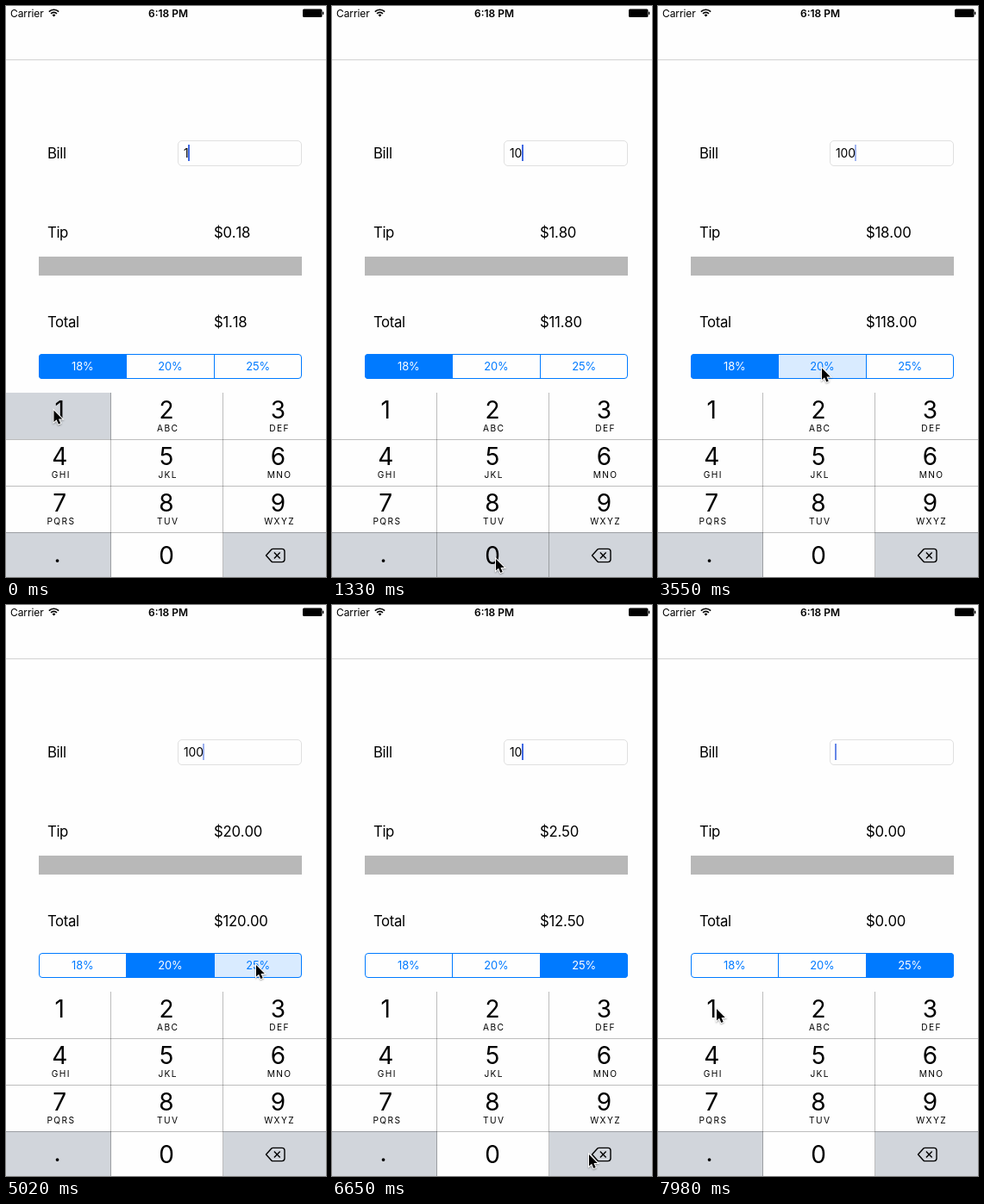
Write an HTML page with a canvas that moves like this. It is 371 px wide and 663 px high and loops after 8000 ms.

```html
<!DOCTYPE html>
<html lang="en">
<head>
<meta charset="utf-8">
<title>Tip calculator</title>
<style>
html, body { margin: 0; width: 100%; height: 100%; overflow: hidden; background: #fefefe; }
canvas { display: block; }
</style>
</head>
<body>
<canvas id="stage" width="371" height="663"></canvas>
<script>
const ctx = document.getElementById('stage').getContext('2d');
const LOOP = 8000, STEP = 147.8;
const BLUE = '#007aff', GRAY = '#d1d5db', WHITE = '#fefefe', BLACK = '#000';

// Pointer stops: arrival time, place, travel time, and the taps made there.
const stops = [
  { at: 0, x: 55.5, y: 469.5, travel: 0, taps: [0], hold: 140, key: '1' },
  { at: 1030, x: 190, y: 642, travel: 850, taps: [1180, 1625], hold: 250, key: '0' },
  { at: 2660, x: 190, y: 420.5, travel: 780, taps: [3540], hold: 290, segment: 1 },
  { at: 4730, x: 290, y: 418, travel: 700, taps: [5020], hold: 290, segment: 2 },
  { at: 5900, x: 317, y: 573.5, travel: 560, taps: [] },
  { at: 6500, x: 298, y: 638, travel: 560, taps: [6500, 6945, 7240, 7535], hold: 140, key: 'del' },
  { at: 7980, x: 68, y: 469, travel: 440, taps: [] },
];
const percents = [18, 20, 25];
const letters = ['', 'ABC', 'DEF', 'GHI', 'JKL', 'MNO', 'PQRS', 'TUV', 'WXYZ'];
const clamp = v => Math.min(1, Math.max(0, v));

// Replays all taps up to time t.
function stateAt(t) {
  const s = { bill: '', rate: 0, key: '', segment: -1, typed: 0 };
  for (const { taps, hold, key, segment } of stops) {
    for (const tap of taps) {
      if (tap > t) continue;
      const held = t < tap + hold;
      if (key) {
        s.bill = key === 'del' ? s.bill.slice(0, -1) : s.bill + key;
        s.typed = tap;
        if (held) s.key = key;
      } else if (held) s.segment = segment;
      else s.rate = segment;
    }
  }
  return s;
}

// Solid after typing, then blinking with short fades.
function caretAlpha(since) {
  const period = 970, dark = 724;
  const cycle = Math.max(0, Math.round((since - dark) / period));
  return clamp((Math.abs(since - dark - cycle * period) - 230) / 160 + 0.5);
}

function pointerAt(t) {
  let [x, y] = [stops[0].x, stops[0].y];
  for (const s of stops.slice(1)) {
    const u = clamp((t - s.at + s.travel) / s.travel), e = u * u * (3 - 2 * u);
    x += (s.x - x) * e;
    y += (s.y - y) * e;
  }
  return [x, y];
}

function text(str, x, y, size, { color = BLACK, align = 'left', weight = 400, spacing = 0, kern = 'auto' } = {}) {
  ctx.font = `${weight} ${size}px Inter, "Open Sans", sans-serif`;
  ctx.letterSpacing = spacing + 'px';
  ctx.fontKerning = kern;
  ctx.textAlign = align;
  ctx.fillStyle = color;
  ctx.fillText(str, x, y);
  return ctx.measureText(str).width;
}

function rect(x, y, w, h, color) {
  ctx.fillStyle = color;
  ctx.fillRect(x, y, w, h);
}

function roundPath(x, y, w, h, r) {
  ctx.beginPath();
  ctx.roundRect(x, y, w, h, r);
}

function fill(color) {
  ctx.fillStyle = color;
  ctx.fill();
}

function stroke(color, width) {
  ctx.strokeStyle = color;
  ctx.lineWidth = width;
  ctx.stroke();
}

function drawStatus() {
  text('Carrier', 5, 12.5, 12, { spacing: -0.1 });
  text('6:18 PM', 188, 12.5, 12, { align: 'center', weight: 600 });
  const from = -Math.PI * 3 / 4, to = -Math.PI / 4;
  for (const r of [4.9, 8]) {
    ctx.beginPath();
    ctx.arc(55.5, 12.3, r, from, to);
    stroke(BLACK, 1.6);
  }
  ctx.beginPath();
  ctx.moveTo(55.5, 12.6);
  ctx.arc(55.5, 12.3, 2.7, from, to);
  fill(BLACK);
  roundPath(344, 3.5, 22.5, 9.5, 1.5);
  fill(BLACK);
  rect(367, 6.7, 1.3, 3.2, BLACK);
  rect(0, 62, 371, 1, '#d2d2d2');
}

function drawForm(state, t) {
  const bill = Number(state.bill), tip = bill * percents[state.rate] / 100;
  const label = (str, y) => text(str, 48, y, 16.8, { spacing: -0.4 });
  const amount = (v, y) => text('$' + v.toFixed(2), 241, y, 16.8, { spacing: -0.25, kern: 'none' });
  label('Bill', 177);
  label('Tip', 269);
  label('Total', 373);
  amount(tip, 269);
  amount(bill + tip, 373);
  rect(38, 291, 305, 22, '#b8b8b8');

  roundPath(199.5, 156.5, 143, 29, 4.5);
  stroke('#e0e0e0', 1);
  const width = text(state.bill, 206, 176, 13.9, { spacing: -0.1, kern: 'none' });
  ctx.globalAlpha = caretAlpha(t - state.typed);
  rect(206 + Math.round(width - 0.6), 161, 2, 19, '#4169e1');
  ctx.globalAlpha = 1;
}

function drawSegments({ rate, segment }) {
  const w = 305 / 3;
  ctx.save();
  roundPath(38, 404, 305, 29, 4);
  ctx.clip();
  percents.forEach((p, i) => {
    const x = 38 + i * w, on = i === rate;
    if (on || i === segment) rect(x, 404, w, 29, on ? BLUE : '#d9ebff');
    if (i) rect(Math.floor(x), 404, 1, 29, BLUE);
    text(p + '%', x + w / 2, 423, 12.9, { color: on ? WHITE : BLUE, align: 'center', spacing: -0.1 });
  });
  ctx.restore();
  roundPath(38.5, 404.5, 304, 28, 3.5);
  stroke(BLUE, 1);
}

function drawDelete(pressed) {
  ctx.lineJoin = 'round';
  ctx.beginPath();
  ctx.moveTo(301.5, 638);
  ctx.arcTo(308.4, 630.4, 323, 630.4, 2);
  ctx.arcTo(323, 630.4, 323, 645.6, 3);
  ctx.arcTo(323, 645.6, 308.4, 645.6, 3);
  ctx.arcTo(308.4, 645.6, 301.5, 638, 2);
  ctx.closePath();
  if (pressed) fill(BLACK);
  stroke(BLACK, 1.4);
  ctx.beginPath();
  for (const s of [-3.4, 3.4]) {
    ctx.moveTo(310.9, 638 - s);
    ctx.lineTo(317.7, 638 + s);
  }
  stroke(pressed ? WHITE : BLACK, 1.4);
}

function drawKeypad(pressed) {
  const keys = [...'123456789.0', 'del'];
  keys.forEach((key, i) => {
    const col = i % 3, row = Math.floor(i / 3);
    const x = Math.max(0, col * 130 - 8), y = 449 + row * 54;
    const mid = [62.2, 186, 315.4][col];
    const dark = (key === '.' || key === 'del') !== (key === pressed);
    rect(x, y, 130, 54, dark ? GRAY : WHITE);
    if (key === 'del') drawDelete(dark === false);
    else if (key === '.') text(key, 59.5, 645.5, 28, { align: 'center' });
    else text(key, mid, row < 3 ? y + 30 : 648, 28, { align: 'center' });
    if (letters[i]) text(letters[i], mid + 1.7, y + 45, 10.2, { align: 'center', spacing: 1.4 });
  });
  const line = 'rgba(0, 0, 0, 0.26)';
  for (const x of [121, 251]) rect(x, 449, 1, 214, line);
  for (let y = 503; y < 663; y += 54) rect(0, y, 371, 1, line);
}

function drawPointer([x, y]) {
  ctx.save();
  ctx.translate(x, y);
  const arrow = new Path2D('M0 0V13.6L3.1 10.8 5.3 16 7.7 15 5.5 9.9H9.8Z');
  ctx.shadowColor = 'rgba(0, 0, 0, 0.35)';
  ctx.shadowBlur = 2;
  ctx.shadowOffsetY = 1;
  ctx.lineJoin = 'miter';
  ctx.lineWidth = 2;
  ctx.strokeStyle = WHITE;
  ctx.stroke(arrow);
  ctx.shadowColor = 'transparent';
  ctx.fillStyle = BLACK;
  ctx.fill(arrow);
  ctx.restore();
}

function draw(now) {
  // The picture advances in even steps, like a screen recording.
  const t = Math.floor((now % LOOP + 8) / STEP) * STEP;
  const state = stateAt(t);
  rect(0, 0, 371, 663, WHITE);
  drawStatus();
  drawForm(state, t);
  drawSegments(state);
  drawKeypad(state.key);
  drawPointer(pointerAt(t));
}

const start = performance.now();
function tick() {
  draw(performance.now() - start);
  requestAnimationFrame(tick);
}
tick();
</script>
</body>
</html>
```
